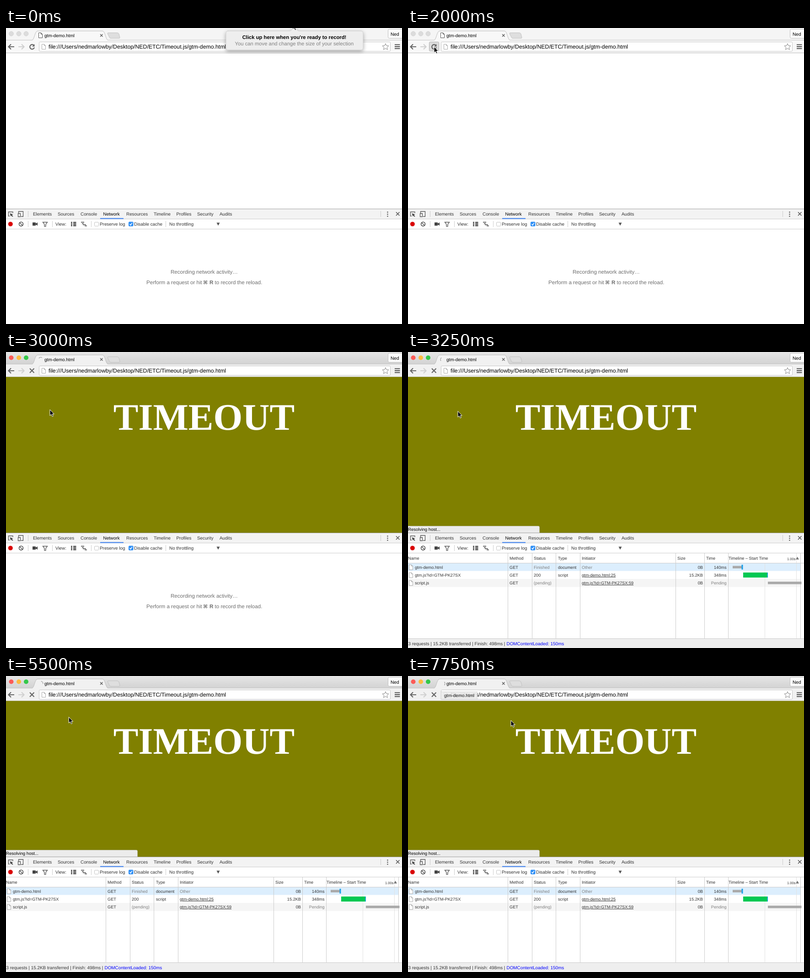
These frames come from a looping animation (866x647 px, 8 s). An HTML page:

```html
<!DOCTYPE html>
<html lang="en">
<head>
<meta charset="utf-8">
<title>Network panel recording</title>
<style>
  html, body { margin: 0; width: 100%; height: 100%; overflow: hidden; background: #fff; }
  svg { display: block; }
  text { font: 9.9px "Liberation Sans", Arial, sans-serif; text-rendering: geometricPrecision; fill: #333; white-space: pre; }
  .black { fill: #000; }
  .dim { fill: #808080; }
  .url { font-size: 12.27px; }
  .hint, .hint tspan { font-size: 11.6px; fill: #6e6e6e; }
  .bubble { font-size: 11.25px; text-anchor: middle; }
  .cell { font-size: 9.2px; }
  .end { text-anchor: end; }
  .link { text-decoration: underline; }
  .title { font: bold 82px "Liberation Serif", Times, serif; fill: #fff; text-anchor: middle; }
  .bold { font-weight: bold; }
  .line { fill: none; stroke: #ccc; }
  .icon { fill: none; stroke: #5a5a5a; stroke-width: 1.3; }
  .nav { fill: none; stroke: #666; stroke-width: 2.2; }
  #strip { fill: #f5f5f5; }
  #tab, #bar { fill: #f8f8f8; }
  #seam { stroke: #f8f8f8; stroke-width: 2; }
  #lights circle { fill: #dcdcdc; stroke: #cdcdcd; stroke-width: .7; }
  .active #strip { fill: url(#metal); }
  .active #tab, .active #bar { fill: #f1f1f1; }
  .active #seam { stroke: #f1f1f1; }
  .active #lights circle { fill: var(--on); stroke: none; }
</style>
</head>
<body>
<svg id="stage" width="866" height="647" viewBox="0 0 866 647">
  <defs>
    <linearGradient id="metal" x2="0" y2="1"><stop stop-color="#e6e6e6"/><stop offset="1" stop-color="#d2d2d2"/></linearGradient>
    <filter id="shadow" x="-10%" y="-30%" width="120%" height="180%"><feDropShadow dx="0" dy="3" stdDeviation="4" flood-opacity=".35"/></filter>
    <path id="sheet" d="M.5.5H5.5L8.5 3.5V11.5H.5ZM5.5.5V3.5H8.5" fill="#fff"/>
  </defs>

  <!-- Browser window -->
  <rect id="strip" width="866" height="27"/>
  <rect id="bar" y="26" width="866" height="28"/>
  <path class="line" style="stroke:#c4c4c4" d="M0 26.5H866"/>
  <path id="tab" stroke="#bdbdbd" d="M57 26.5C62 26 63 6.5 69 6.5H211C217 6.5 218 26 223 26.5"/>
  <path id="seam" d="M58 27H222"/>
  <path d="M224 10.5H243Q246 10.5 247 13L249 21Q249 22.5 247 22.5H229Q227 22.5 226 20L222 12Q222 10.5 224 10.5Z" fill="#dedede" stroke="#c2c2c2"/>
  <g id="lights">
    <circle cx="11.5" cy="12.5" r="5" style="--on:#fc5b57"/>
    <circle cx="28" cy="12.5" r="5" style="--on:#fdbc40"/>
    <circle cx="44" cy="12.5" r="5" style="--on:#34c84a"/>
  </g>
  <use id="favicon" href="#sheet" x="71" y="10" stroke="#555"/>
  <path id="spinner" d="M-3.5 -3.5A5 5 0 0 1 3.5 -3.5" fill="none" stroke="#999" stroke-width="1.3"/>
  <text class="black" x="84" y="20">gtm-demo.html</text>
  <path class="icon" d="M206 13.5L211.5 19M211.5 13.5L206 19"/>
  <rect x="835.5" y="2.5" width="40" height="20" rx="3" fill="#fafafa" stroke="#c0c0c0"/>
  <text class="black" x="841" y="17" style="font-size:10.2px">Ned</text>

  <path class="nav" d="M18 41H6M11 35.5L5.5 41L11 46.5"/>
  <path class="nav" style="stroke:#d0d0d0" d="M27 41H39M34 35.5L39.5 41L34 46.5"/>
  <rect id="press" x="46.5" y="30.5" width="21" height="20" rx="2" stroke="#b0b0b0"/>
  <g id="reload"><path class="nav" d="M61 38A5 5 0 1 0 62 42.5"/><path d="M62.5 35V40.5H57Z" fill="#666"/></g>
  <path id="stop" class="nav" d="M52 36L61.5 45.5M61.5 36L52 45.5"/>
  <rect x="72.5" y="30.5" width="768" height="20.5" rx="2" fill="#fff" stroke="#c6c6c6"/>
  <use href="#sheet" x="78" y="35" stroke="#aaa"/>
  <text class="url black" x="93" y="45">file:///Users/nedmarlowby/Desktop/NED/ETC/Timeout.js/gtm-demo.html</text>
  <path d="M830 34L831.9 38.5L837 39L833.2 42.4L834.4 47.3L830 44.7L825.6 47.3L826.8 42.4L823 39L828.1 38.5Z" class="icon" style="stroke:#888;stroke-width:1"/>
  <path class="nav" style="stroke:#555" d="M850 36.5H861.5M850 40.8H861.5M850 45H861.5"/>

  <!-- Page -->
  <path class="line" style="stroke:#bbb" d="M0 54.5H866"/>
  <g id="page">
    <rect y="54.5" width="866" height="341" fill="olive"/>
    <text class="title" x="433" y="169.5">TIMEOUT</text>
  </g>

  <!-- Developer tools -->
  <rect y="395" width="866" height="22" fill="#f3f3f3"/>
  <path class="line" style="stroke:#a3a3a3" d="M0 395.5H866"/>
  <path class="line" d="M0 417.5H866M0 439.5H866M48.5 400V413M819.5 400V413M48.5 422V435M101.5 422V435M186.5 422V435M349.5 422V435"/>
  <path class="icon" d="M8 411H5.5V402H15V404.5M27.5 406V401H37.5V412H33M26.5 405.5H31.5V412.5H26.5Z"/>
  <path d="M8.5 405L15.5 407.5L12.8 408.8L15.5 411.5L14.3 412.7L11.5 410L10.5 412Z" fill="#444"/>
  <g id="tabs"></g>
  <rect x="206" y="415.5" width="51" height="2" fill="#4285f4"/>
  <path d="M834.5 402.5h.01M834.5 407h.01M834.5 411.5h.01" stroke="#555" stroke-width="2.6" stroke-linecap="round"/>
  <path class="icon" style="stroke-width:1.7" d="M853 402.5L860.5 410M860.5 402.5L853 410"/>
  <circle cx="9.8" cy="428.5" r="5.6" fill="#f6c0c0"/><circle cx="9.8" cy="428.5" r="4.8" fill="#d90000"/>
  <path class="icon" style="stroke-width:1.6" d="M28.5 428.5a4.5 4.5 0 1 0 9 0a4.5 4.5 0 1 0 -9 0M30 425.5L36 431.5"/>
  <path d="M58 425H65V427.5L69 425V432L65 429.5V432H58Z" fill="#444"/>
  <path class="icon" d="M80.5 424.5H90.5L87 429V433.5H84V429Z"/>
  <text x="108" y="432">View:</text>
  <path stroke="#444" stroke-width="2.3" d="M142 425H145M147 425H153.5M142 428.5H145M147 428.5H153.5M142 432H145M147 432H153.5"/>
  <path stroke="#444" stroke-width="1.5" d="M164 424.5H171M166 427.5H170M168 430H175M172 432.5H177"/>
  <rect x="193.5" y="424.5" width="9" height="8.5" rx="1.5" fill="#fff" stroke="#c4c4c4"/>
  <text x="205" y="432">Preserve log</text>
  <rect x="268" y="423.5" width="10.5" height="10" rx="2" fill="#2f8ff5"/>
  <path d="M270.5 428.5L272.5 431L276 425.8" fill="none" stroke="#fff" stroke-width="1.4"/>
  <text x="280" y="432">Disable cache</text>
  <text x="357" y="432">No throttling</text>
  <path d="M460.5 425.5H467.5L464 432Z" fill="#555"/>

  <g id="empty">
    <text class="hint" x="360" y="537">Recording network activity…</text>
    <text class="hint" x="307" y="560">Perform a request or hit</text>
    <text class="hint bold" x="431" y="560" style="font-family:'DejaVu Sans',sans-serif;font-size:11px">⌘</text>
    <text class="hint" x="445" y="560"><tspan class="bold">R</tspan> to record the reload.</text>
  </g>

  <g id="log">
    <path d="M0 380.5H285Q287.5 380.5 287.5 383V395H0Z" fill="#ececec" stroke="#c2c2c2" stroke-width=".6"/>
    <text class="black" x="0" y="391" style="font-size:9.6px">Resolving host...</text>
    <rect y="461.5" width="858" height="17" fill="#dceefd"/>
    <rect y="496" width="858" height="17.5" fill="#f5f5f5"/>
    <path class="line" style="stroke:#e2e2e2" d="M780.5 461V626M849.5 440V626"/>
    <path class="line" d="M0 461.5H866M218.5 440V626M271.5 440V626M323.5 440V626M376.5 440V626M585.5 440V626M648.5 440V626M700.5 440V626M858.5 440V626"/>
    <g id="cells"></g>
    <text x="829" y="455" style="font-size:7.6px">1.00s</text>
    <path d="M848 453.5H855L851.5 447.5Z" fill="#777"/>
    <path d="M710 467.5H730V473H710ZM787 502H860.5V507.5H787Z" fill="#aaa"/>
    <path d="M729.5 465H732.5V475.5H729.5ZM785 482H787V493H785Z" fill="#1b9fe8"/>
    <rect x="733" y="482" width="52.5" height="11" fill="#00c853"/>
    <rect y="626" width="866" height="21" fill="#eee"/>
    <path class="line" d="M0 626.5H866"/>
    <text x="0.5" y="640.5">3 requests | 15.2KB transferred | Finish: 498ms | </text>
    <text x="215.5" y="640.5" style="fill:#00f">DOMContentLoaded: 150ms</text>
  </g>

  <!-- Overlays -->
  <g id="tip">
    <rect x="72" y="34.5" width="79.5" height="16.5" fill="#ececec" stroke="#bbb" stroke-width=".6"/>
    <text class="black" x="79" y="46">gtm-demo.html</text>
  </g>
  <g id="prompt">
    <path filter="url(#shadow)" d="M485 6.5H620C625 6.5 627 0 630.5 -2C634 0 636 6.5 641 6.5H776Q781 6.5 781 11.5V43Q781 48 776 48H486Q481 48 481 43V11.5Q481 6.5 486 6.5Z" fill="#eee" stroke="#bbb" stroke-width=".6"/>
    <text class="bubble bold black" x="630.5" y="24">Click up here when you're ready to record!</text>
    <text class="bubble dim" x="630.5" y="38">You can move and change the size of your selection</text>
  </g>
  <path id="cursor" d="M0 0V13L3 10.3L5.2 15L7.4 14L5.2 9.6H9.2Z" stroke="#fff"/>
</svg>
<script>
const $ = id => document.getElementById(id);
const STEP = 250, STEPS = 32;
const label = (x, y, text, cls = '') => `<text x="${x}" y="${y}" class="${cls}">${text}</text>`;

const tabs = { Elements: 59, Sources: 113, Console: 163, Network: 212.5, Resources: 263,
  Timeline: 323, Profiles: 372.5, Security: 418, Audits: 467 };
$('tabs').innerHTML = Object.entries(tabs)
  .map(([name, x]) => label(x, 410, name, name === 'Network' ? 'black' : '')).join('');

const columns = [15, 222, 275, 328, 380, 645, 696.5];
const rows = [
  ['gtm-demo.html', 'GET', 'Finished', 'document', 'Other', '0B', '140ms'],
  ['gtm.js?id=GTM-PK27SX', 'GET', '200', 'script', 'gtm-demo.html:25', '15.2KB', '348ms'],
  ['script.js', 'GET', '(pending)', '', 'gtm.js?id=GTM-PK27SX:59', '0B', 'Pending'],
];
const headings = { Name: 0, Method: 222, Status: 275, Type: 328, Initiator: 380, Size: 589, Time: 652, 'Timeline – Start Time': 701 };
const cellClass = (text, col) => ['cell', col > 4 && 'end', col === 4 && text.includes(':') && 'link',
  /Finished|ending|Other/.test(text) && 'dim'].filter(Boolean).join(' ');
$('cells').innerHTML =
  Object.entries(headings).map(([name, x]) => label(x, 454, name, 'cell')).join('') +
  rows.map((row, r) => `<use href="#sheet" x="2" y="${464.5 + r * 17.2}" stroke="#aaa"/>` +
    row.map((text, c) => label(columns[c], 473.5 + r * 17.2, text, cellClass(text, c))).join('')).join('');

// step, pointer x, pointer y, spinner angle
const keys = [
  [0, 627, -10, 0], [1, 596, 50, 0], [2, 272, 141, 0], [3, 100, 121, 0], [4, 69, 105, 0],
  [5, 100, 48, 0], [6, 57, 41, 0], [10, 57, 41, 0], [11, 69, 82, -45], [12, 96, 126, 10],
  [15, 135, 136, 220], [18, 139, 134, 430], [20, 192, 129, 550], [23, 110, 70, 725],
  [25, 67, 22, 840], [26, 67, 22, 900], [29, 67, 22, 1170], [30, 150, 62, 1260], [31, 225, 97, 1350],
];
function pose(step) {
  const i = keys.findIndex((key, n) => n > 0 && key[0] >= step);
  const a = keys[i - 1], b = keys[i], f = (step - a[0]) / (b[0] - a[0]);
  return a.map((v, n) => v + (b[n] - v) * f);
}
const show = (id, on) => { $(id).style.display = on ? '' : 'none'; };

function draw(now) {
  const step = Math.floor(now / STEP) % STEPS;
  const [, x, y, angle] = pose(step);
  const loading = step >= 11;
  $('stage').classList.toggle('active', loading);
  $('cursor').setAttribute('transform', `translate(${x} ${y})`);
  $('spinner').setAttribute('transform', `translate(76 16.5) rotate(${-angle})`);
  $('press').setAttribute('fill', step > 6 ? '#dcdcdc' : '#f4f4f4');
  $('prompt').style.opacity = step ? .5 : 1;
  $('tip').style.opacity = step === 31 ? .9 : 1;
  show('prompt', step < 2);
  show('spinner', loading);
  show('favicon', !loading);
  show('stop', loading);
  show('reload', !loading);
  show('press', step >= 6 && step <= 11);
  show('page', step >= 12);
  show('log', step >= 13);
  show('empty', step < 13);
  show('tip', step >= 28);
  requestAnimationFrame(draw);
}
requestAnimationFrame(draw);
</script>
</body>
</html>
```
